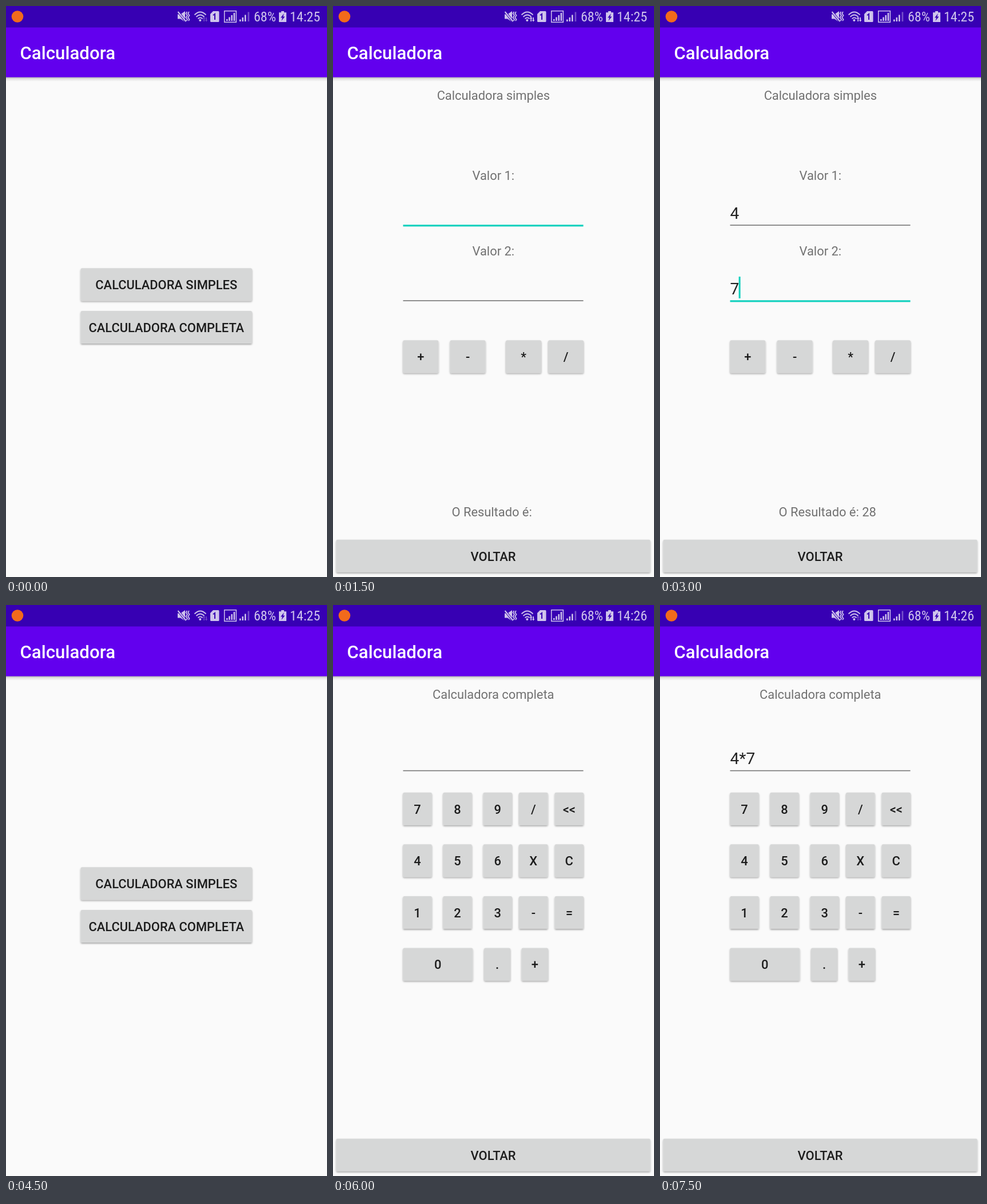
An HTML page for the animation above (8 s loop, 561 by 998 pixels).

```html
<!DOCTYPE html>
<html lang="pt">
<head>
<meta charset="utf-8">
<title>Calculadora</title>
<style>
  html, body { margin: 0; width: 100%; height: 100%; overflow: hidden; background: #fafafa; }
  svg { display: block; width: 561px; height: 998px; font-family: Roboto, sans-serif; }
  .title { font-size: 31.2px; font-weight: 500; fill: #fff; }
  .status { font-size: 24px; font-family: "Roboto Condensed", Roboto, sans-serif; font-stretch: 75%; }
  .label { font-size: 21.85px; fill: #717171; }
  .entry { font-size: 28.1px; fill: #212121; }
  .key rect { fill: #d6d7d7; filter: url(#lift); }
  .key text { font-size: 21.85px; font-weight: 500; fill: #1c1c1c; text-anchor: middle; }
  .mid { text-anchor: middle; }
</style>
</head>
<body>
<svg viewBox="0 0 561 998">
  <defs>
    <filter id="lift" x="-20%" y="-20%" width="140%" height="150%">
      <feDropShadow dx="0" dy="1.8" stdDeviation="1.4" flood-color="#000" flood-opacity=".34"/>
    </filter>
    <linearGradient id="shade" x2="0" y2="1">
      <stop stop-color="#000" stop-opacity=".32"/>
      <stop offset=".4" stop-color="#000" stop-opacity=".1"/>
      <stop offset="1" stop-color="#000" stop-opacity="0"/>
    </linearGradient>
  </defs>
  <rect width="561" height="998" fill="#fafafa"/>
  <rect y="124" width="561" height="8" fill="url(#shade)"/>
  <rect y="37" width="561" height="87.5" fill="#6200ee"/>
  <rect width="561" height="37.5" fill="#3700b3"/>
  <text class="title" x="24.5" y="93">Calculadora</text>
  <circle cx="20" cy="18.5" r="10.3" fill="#f26a1b"/>

  <g fill="#cfc4ec" stroke="#cfc4ec" stroke-width="0">
    <!-- muted speaker -->
    <path d="M300 14.5h5l8-5.5v19l-8-5.5h-5z"/>
    <path d="M300.5 9.5L314 27" stroke="#3700b3" stroke-width="4"/>
    <path d="M300.5 10L314.5 27" stroke-width="2"/>
    <path d="M316.5 10l-2 3 2.5 3.5-2.5 3.5 2.5 3.5-1.5 2.5M320 10l-2 3 2.5 3.5-2.5 3.5 2.5 3.5-1.5 2.5" fill="none" stroke-width="1.7"/>
    <!-- wifi -->
    <path d="M329.5 15.5Q339.5 5.5 349.5 15.5M332.5 19Q339.5 12 346.5 19M335.5 22.3Q339.5 18.5 343.5 22.3" fill="none" stroke-width="1.8"/>
    <circle cx="339.3" cy="25" r="2"/>
    <path id="traffic" d="M345.2 27v-5h-1.7l2.6-3 2.6 3H347v5zM349.2 20v4.5h-1.5l2.4 3 2.4-3H351V20z"/>
    <!-- SIM card -->
    <path d="M362 9h9a1.5 1.5 0 0 1 1.5 1.5v16A1.5 1.5 0 0 1 371 28h-12.500a1.500 1.500 0 0 1-1.500-1.500V14z"/>
    <path d="M362 16.200l3-2.200v10" fill="none" stroke="#3700b3" stroke-width="2"/>
    <!-- signals -->
    <rect x="381.7" y="8.7" width="20.600" height="19.600" fill="none" stroke-width="1.500"/>
    <path d="M385 26v-3h2.500v3zM389.200 26v-6.500h2.500V26zM393.400 26V16h2.500v10zM397.600 26V12h2.500v14z"/>
    <path d="M408 27v-3.500h2.500V27zM412.500 27v-7h2.500v7zM417 27V15.500h2.500V27z"/>
    <path d="M422.500 27V10.500h2.700V27z" opacity=".4"/>
    <!-- battery -->
    <path d="M481 9h5v2.300h4V28h-13V11.300h4z"/>
    <path d="M485.800 13l-5.800 7.500h3l-1.600 5.500 6-7.500h-3.100z" fill="#3700b3"/>
    <text class="status" x="433" y="27">68%</text>
    <text class="status" id="clock" x="496" y="27"></text>
  </g>
  <g id="screen"></g>
</svg>
<script>
const TEAL = "#0fd0bd", GRAY = "#757575";
const screen = document.getElementById("screen");
const clock = document.getElementById("clock");
const traffic = document.getElementById("traffic");

const key = (text, x, y, w) => `<g class="key">
  <rect x="${x}" y="${y}" width="${w}" height="57" rx="2.5"/>
  <text x="${x + w / 2}" y="${y + 36.8}">${text}</text></g>`;
const label = (text, y) => `<text class="label mid" x="280.3" y="${y}">${text}</text>`;
const entry = (text, y) => `<text class="entry" x="122.5" y="${y}">${text}</text>`;
const line = (y, focused) => `<rect x="122.5" y="${y}" width="315"
  height="${focused ? 3.1 : 1.6}" fill="${focused ? TEAL : GRAY}"/>`;
const back = key("VOLTAR", 5.5, 932.8, 549);

const menu = () =>
  key("CALCULADORA SIMPLES", 130.5, 458.2, 299.5) +
  key("CALCULADORA COMPLETA", 130.5, 533, 299.5);

const simple = (a, b, result, second) =>
  label("Calculadora simples", 163.5) + label("Valor 1:", 304) + label("Valor 2:", 435.5) +
  entry(a, 371.5) + line(382.3, !second) + entry(b, 503.5) + line(514.3, second) +
  (second ? `<rect x="137.6" y="473" width="3" height="38" fill="${TEAL}"/>` : "") +
  key("+", 122.3, 584.3, 62) + key("-", 204.5, 584.3, 62) +
  key("*", 302, 584.3, 62) + key("/", 376, 584.3, 62) +
  `<text class="label" x="207.5" y="892">O Resultado é: ${result}</text>` + back;

const columns = [122.3, 192.3, 262.5, 325, 387.5];
const rows = [["7", "8", "9", "/", "&lt;&lt;"], ["4", "5", "6", "X", "C"], ["1", "2", "3", "-", "="]];
const full = text =>
  label("Calculadora completa", 163.5) + entry(text, 278) + line(288.8, false) +
  rows.map((row, r) => row.map((k, c) => key(k, columns[c], 327.7 + r * 90.6, 50.5)).join("")).join("") +
  key("0", 122.3, 599.5, 122) + key(".", 264, 599.5, 46) + key("+", 329.5, 599.5, 46.5) + back;

// start time, clock, data traffic, screen
const steps = [
  [0, "14:25", false, menu()],
  [1500, "14:25", true, simple("", "", "", false)],
  [3000, "14:25", true, simple("4", "7", "28", true)],
  [4500, "14:25", false, menu()],
  [6000, "14:26", true, full("")],
  [7500, "14:26", false, full("4*7")]
];
let shown;

function draw(now) {
  const t = now % 8000;
  const step = steps.findLast(s => s[0] <= t);
  if (step !== shown) {
    shown = step;
    clock.textContent = step[1];
    traffic.setAttribute("opacity", step[2] ? 1 : 0.35);
    screen.innerHTML = step[3];
  }
}

const start = performance.now();
function tick() {
  draw(performance.now() - start);
  requestAnimationFrame(tick);
}
tick();
</script>
</body>
</html>
```
